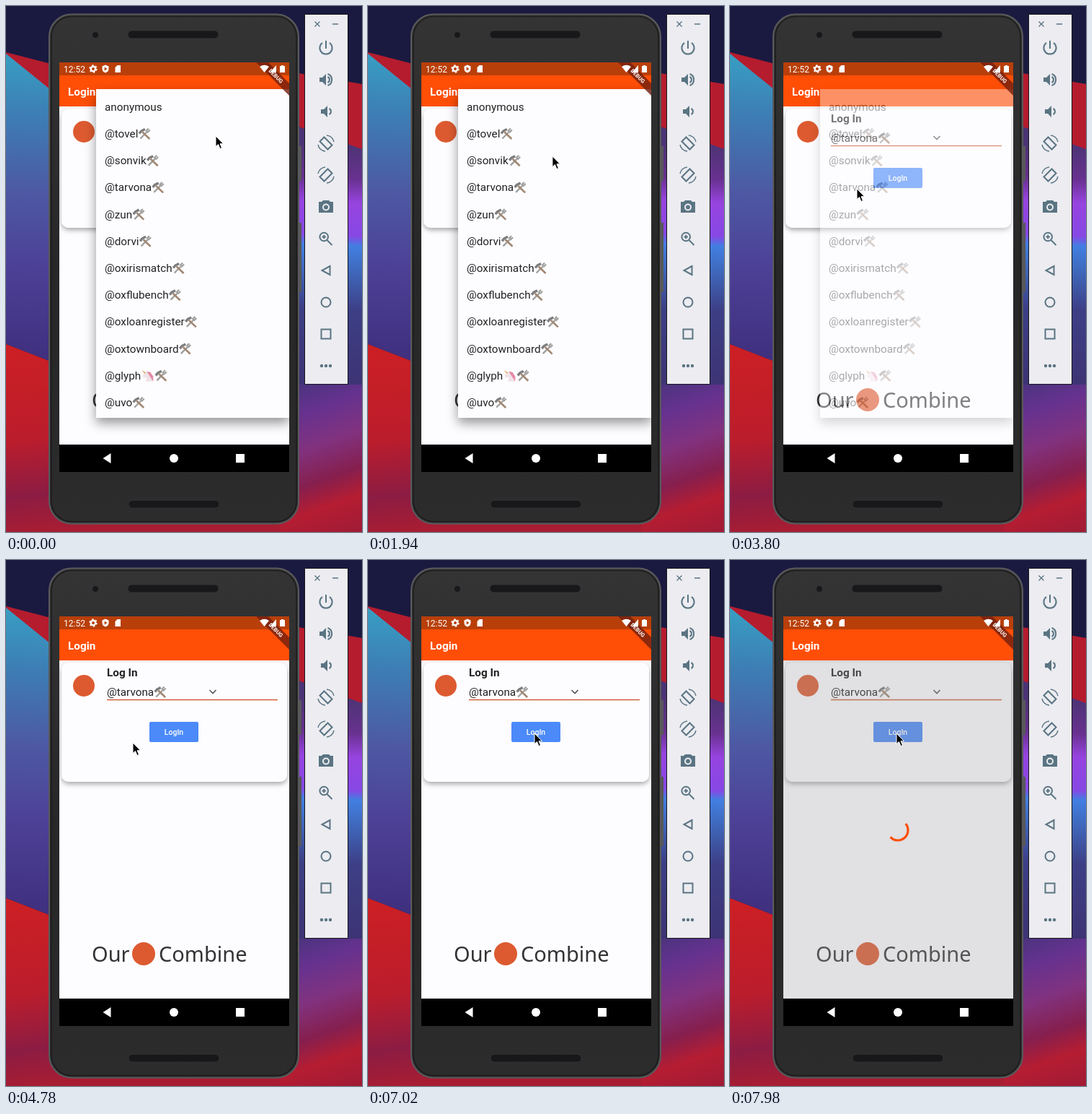
These frames come from a looping animation (494x728 px, 8 s). An HTML page:

```html
<!DOCTYPE html>
<html lang="en">
<head>
<meta charset="utf-8">
<title>Login demo</title>
<style>
html, body { margin: 0; width: 100%; height: 100%; overflow: hidden; background: #1a1a40; }
svg { display: block; width: 100%; height: 100%; }
text { font-family: Roboto, sans-serif; font-size: 15.3px; fill: #222; }
.bold { font-weight: 700; }
.brand { font: 500 29px "Noto Sans", sans-serif; fill: #333; }
.light { fill: #fff; }
.line { fill: none; stroke: #5a7482; stroke-width: 2; }
.thin { stroke-width: 1.4; }
.solid { fill: #5a7482; }
</style>
</head>
<body>
<svg viewBox="0 0 494 728">
  <defs>
    <linearGradient id="blueSide" gradientUnits="userSpaceOnUse" x1="20" y1="70" x2="0" y2="480">
      <stop stop-color="#389dc2"/><stop offset=".2" stop-color="#3d7db4"/>
      <stop offset=".45" stop-color="#4d59a4"/><stop offset=".7" stop-color="#4d4197"/>
      <stop offset="1" stop-color="#403080"/>
    </linearGradient>
    <linearGradient id="redSide" gradientUnits="userSpaceOnUse" x1="20" y1="470" x2="50" y2="728">
      <stop stop-color="#cc1f24"/><stop offset=".5" stop-color="#bb1d2c"/>
      <stop offset=".8" stop-color="#8c1c43"/><stop offset="1" stop-color="#a81d32"/>
    </linearGradient>
    <linearGradient id="rightSide" gradientUnits="userSpaceOnUse" x1="484" y1="190" x2="470" y2="520">
      <stop stop-color="#4b3474"/><stop offset=".15" stop-color="#68318f"/>
      <stop offset=".25" stop-color="#9744df"/><stop offset=".39" stop-color="#8648e4"/>
      <stop offset=".43" stop-color="#427fe2"/><stop offset=".53" stop-color="#3f69bd"/>
      <stop offset=".7" stop-color="#3d3f86"/><stop offset="1" stop-color="#3d3475"/>
    </linearGradient>
    <linearGradient id="lowerRight" gradientUnits="userSpaceOnUse" x1="410" y1="500" x2="490" y2="728">
      <stop stop-color="#3d3475"/><stop offset=".25" stop-color="#66328f"/>
      <stop offset=".45" stop-color="#81327f"/><stop offset=".65" stop-color="#861f4e"/>
      <stop offset=".8" stop-color="#b51d32"/><stop offset="1" stop-color="#a01b35"/>
    </linearGradient>
    <linearGradient id="body" x2="0" y2="1">
      <stop stop-color="#343435"/><stop offset=".5" stop-color="#272728"/><stop offset="1" stop-color="#2c2c2d"/>
    </linearGradient>
    <filter id="cardShadow" x="-20%" y="-20%" width="140%" height="150%">
      <feDropShadow dx="0" dy="3" stdDeviation="3.5" flood-color="#000" flood-opacity=".35"/>
    </filter>
    <filter id="menuShadow" x="-20%" y="-20%" width="140%" height="140%">
      <feDropShadow dx="0" dy="7" stdDeviation="8" flood-color="#000" flood-opacity=".42"/>
    </filter>
    <clipPath id="screenClip"><path d="M74 78h319v567H74z"/></clipPath>
    <g id="tools" fill="none">
      <path d="M3 15.5L12 6.5" stroke="#a0a09e" stroke-width="2.4"/>
      <path d="M16.5 3.5l-3 3-2-2 3-3" stroke="#a0a09e" stroke-width="2.2"/>
      <path d="M6 6.5l10 9.5" stroke="#a18772" stroke-width="2.6"/>
      <path d="M1.5 8.5l3-3.5 5-2.5" stroke="#7d7d7d" stroke-width="3.4"/>
    </g>
    <g id="unicorn">
      <path d="M3 7l6-4 6 6 1 8H7l1-6-5 1z" fill="#f0e3e8"/>
      <path d="M8 3l5 1 4 6v7l-4-6z" fill="#e58aa5"/>
      <path d="M1 1l6 4-2 1z" fill="#dba255"/>
    </g>
    <g id="rotate">
      <path class="line" d="M-2.500-8.500L-8.500-2.500 2.500 8.500 8.500 2.500z"/>
      <path class="line thin" d="M-1 11A11 11 0 0 1-11 2M1-11A11 11 0 0 1 11-2"/>
    </g>
  </defs>

  <!-- Desktop -->
  <path fill="#1a1a40" d="M0 0h494v728H0z"/>
  <path fill="#b51c2e" d="M0 64L62 80V120L0 68zM400 92L494 108V200L400 165z"/>
  <path fill="url(#blueSide)" d="M0 66L62 116V492L0 468z"/>
  <path fill="url(#redSide)" d="M0 468L62 492 400 700V728H0z"/>
  <path fill="url(#rightSide)" d="M400 165L494 198V524H400z"/>
  <path fill="url(#lowerRight)" d="M380 524H494V728H380z"/>

  <!-- Phone -->
  <path fill="#58585a" d="M406 194h4v48h-4zM406 300h4v96h-4z"/>
  <rect x="60" y="11.5" width="346" height="705" rx="31" fill="url(#body)" stroke="#5a5a5c" stroke-width="2"/>
  <rect x="63" y="14.5" width="340" height="699" rx="28" fill="none" stroke="#1c1c1d" stroke-width="1.5"/>
  <g fill="#18181a" stroke="#3c3c3e" stroke-width=".7">
    <rect x="169" y="34" width="126" height="11" rx="5.5"/>
    <rect x="170" y="684" width="126" height="11" rx="5.5"/>
    <circle cx="124" cy="40" r="4.5"/>
  </g>

  <!-- Screen -->
  <g clip-path="url(#screenClip)">
    <path fill="#fdfcff" d="M74 78h319v567H74z"/>
    <rect x="77" y="142" width="313" height="165" rx="10" fill="#fdfcff" filter="url(#cardShadow)"/>
    <circle cx="108" cy="174" r="15" fill="#dd5a30"/>
    <text class="bold" x="140" y="161">Log In</text>
    <g id="field"></g>
    <path d="M282.500 180l4.500 4.500 4.500-4.500" fill="none" stroke="#555" stroke-width="1.6"/>
    <path d="M140 193.500h237" stroke="#cd6238" stroke-width="1.5"/>
    <rect x="199" y="224" width="68" height="28" rx="2" fill="#4b8af8"/>
    <text x="233" y="242" text-anchor="middle" style="font-size:10.500px;font-weight:500;fill:#fff">LogIn</text>
    <text class="brand" x="119" y="556">Our</text>
    <circle cx="191" cy="545" r="16" fill="#dd5a30"/>
    <text class="brand" x="212" y="556">Combine</text>

    <path fill="#ff4e06" d="M74 96h319v43H74z"/>
    <text class="bold light" x="86" y="124">Login</text>

    <g id="loading">
      <path fill="#9e9e9e" fill-opacity=".3" d="M74 139h319v468H74z"/>
      <path id="spinner" fill="none" stroke="#fb4e08" stroke-width="3.200"/>
    </g>
    <g id="menu">
      <path fill="#fdfcff" filter="url(#menuShadow)" d="M125 115h268v455H125z"/>
    </g>

    <path fill="#b83f0a" d="M74 78h319v18H74z"/>
    <g transform="translate(374.500 97) rotate(45)">
      <path fill="#74200f" fill-opacity=".82" d="M-45-6h90V6h-90z"/>
      <text class="bold" y="2.700" text-anchor="middle" style="font-size:7.600px;fill:#fff">DEBUG</text>
    </g>
    <text class="light" x="80" y="91.500" style="font-size:12px">12:52</text>
    <circle cx="121" cy="87" r="3.200" fill="none" stroke="#fff" stroke-width="2.400"/>
    <circle cx="121" cy="87" r="4.900" fill="none" stroke="#fff" stroke-width="1.500" stroke-dasharray="2.565"/>
    <path fill="#fff" fill-rule="evenodd" d="M138 81.500l4.500 2v3.500q0 4-4.500 5.500-4.500-1.500-4.500-5.500v-3.500zM136.700 84.500v5l3.800-2.500zM154.500 82h4.500v10h-7.500v-7z"/>
    <path fill="#fff" d="M352 84q6.500-4.500 13 0l-6.500 8zM375 82v10h-9zM382 83v-1h3v1h2v9h-7v-9z"/>

    <path d="M74 607h319v38H74z"/>
    <path fill="#fff" d="M145.500 619v14l-11-7zM319 620h12v12h-12z"/>
    <circle cx="233" cy="626" r="6" fill="#fff"/>
  </g>

  <!-- Emulator toolbar -->
  <path fill="#ececf1" stroke="#15151a" d="M414.500 11.500h60v512h-60z"/>
  <path class="line thin" d="M428.500 21.500l7 7m0-7l-7 7M453 25h8"/>
  <g id="toolbar"></g>

  <path id="cursor" d="M0 0V14.500L3.500 11.500 6 17.500 8.500 16.500 6 10.700H10.600z" fill="#000" stroke="#fff" stroke-width="1"/>
</svg>
<script>
const LOOP = 8000;
const $ = id => document.getElementById(id);

function add(parent, tag, attributes, content = "") {
  const node = document.createElementNS("http://www.w3.org/2000/svg", tag);
  for (const [key, value] of Object.entries(attributes)) node.setAttribute(key, value);
  node.innerHTML = content;
  return parent.appendChild(node);
}

// A text label followed by its emoji pictures.
function label(parent, x, y, content, emojis) {
  const text = add(parent, "text", { x, y }, content);
  let right = x + text.getComputedTextLength();
  for (const name of emojis) {
    add(parent, "use", { href: "#" + name, x: right, y: y - 14 });
    right += 19;
  }
}

const handles = ["tovel", "sonvik", "tarvona", "zun", "dorvi", "oxirismatch",
  "oxflubench", "oxloanregister", "oxtownboard", "glyph", "uvo"];
label($("menu"), 137, 145, "anonymous", []);
handles.forEach((handle, i) => {
  const emojis = handle === "glyph" ? ["unicorn", "tools"] : ["tools"];
  label($("menu"), 137, 182 + i * 37.2, "@" + handle, emojis);
});
label($("field"), 140, 188, "@tarvona", ["tools"]);

const line = d => `<path class="line" d="${d}"/>`;
const solid = d => `<path class="solid" fill-rule="evenodd" d="${d}"/>`;
const dot = x => `<circle class="solid" cx="${x}" r="2.2"/>`;
const toolbarIcons = [
  line("M0-10V1M-5-7A8.6 8.6 0 1 0 5-7"),
  solid("M-9-3h4l5-5V8l-5-5h-4z") + line("M2.500-4a4.500 4.500 0 0 1 0 8M2.500-8a8.500 8.500 0 0 1 0 16"),
  solid("M-7-3h4l5-5V8l-5-5h-4z") + line("M4.500-4a4.500 4.500 0 0 1 0 8"),
  '<use href="#rotate"/>',
  '<use href="#rotate" transform="scale(-1 1)"/>',
  solid("M-4-9l-2 2h-4V8h20V-7h-4l-2-2zM0-4.500a5 5 0 0 1 0 10a5 5 0 0 1 0-10z") + '<circle class="solid" cy=".5" r="3"/>',
  line("M3-2.500a5.800 5.800 0 1 1-11.600 0a5.800 5.800 0 1 1 11.600 0M1.500 2L8.500 9M-5.500-2.500h5.500M-2.800-5.300v5.500"),
  line("M5.500-6V6L-5.500 0z"),
  line("M-6.500 0a6.500 6.500 0 1 1 13 0a6.500 6.500 0 1 1-13 0"),
  line("M-6.500-6.500h13v13h-13z"),
  dot(-6) + dot(0) + dot(6)
];
toolbarIcons.forEach((icon, i) =>
  add($("toolbar"), "g", { transform: `translate(444 ${58 + i * 44})` }, icon));

// Pointer stops: time, x, y.
const pointer = [[0, 291, 180], [1500, 291, 180], [1940, 256, 208], [2700, 176, 253],
  [5000, 176, 253], [5800, 231, 240], [LOOP, 231, 240]];

function pointerAt(t) {
  const next = pointer.findIndex(stop => stop[0] > t);
  const [t0, x0, y0] = pointer[next - 1];
  const [t1, x1, y1] = pointer[next];
  const p = (t - t0) / (t1 - t0);
  return [x0 + (x1 - x0) * p, y0 + (y1 - y0) * p];
}

function arc(cx, cy, r, start, sweep) {
  const point = degrees => {
    const a = degrees * Math.PI / 180;
    return `${cx + r * Math.cos(a)} ${cy + r * Math.sin(a)}`;
  };
  return `M${point(start)}A${r} ${r} 0 ${sweep > 180 ? 1 : 0} 1 ${point(start + sweep)}`;
}

function draw(t) {
  $("cursor").setAttribute("transform", `translate(${pointerAt(t)})`);
  $("menu").setAttribute("opacity", t < 3790 ? 1 : t < 3900 ? 0.38 : 0);

  const loading = t >= 7500;
  $("loading").setAttribute("visibility", loading ? "visible" : "hidden");
  if (loading) {
    const p = (t - 7500) / 480;
    const sweep = 175 * p * p * (3 - 2 * p) + 3;
    $("spinner").setAttribute("d", arc(233, 374, 14, -90 + 50 * p, sweep));
  }
}

const began = performance.now();
function tick() {
  draw((performance.now() - began) % LOOP);
  requestAnimationFrame(tick);
}
tick();
</script>
</body>
</html>
```
